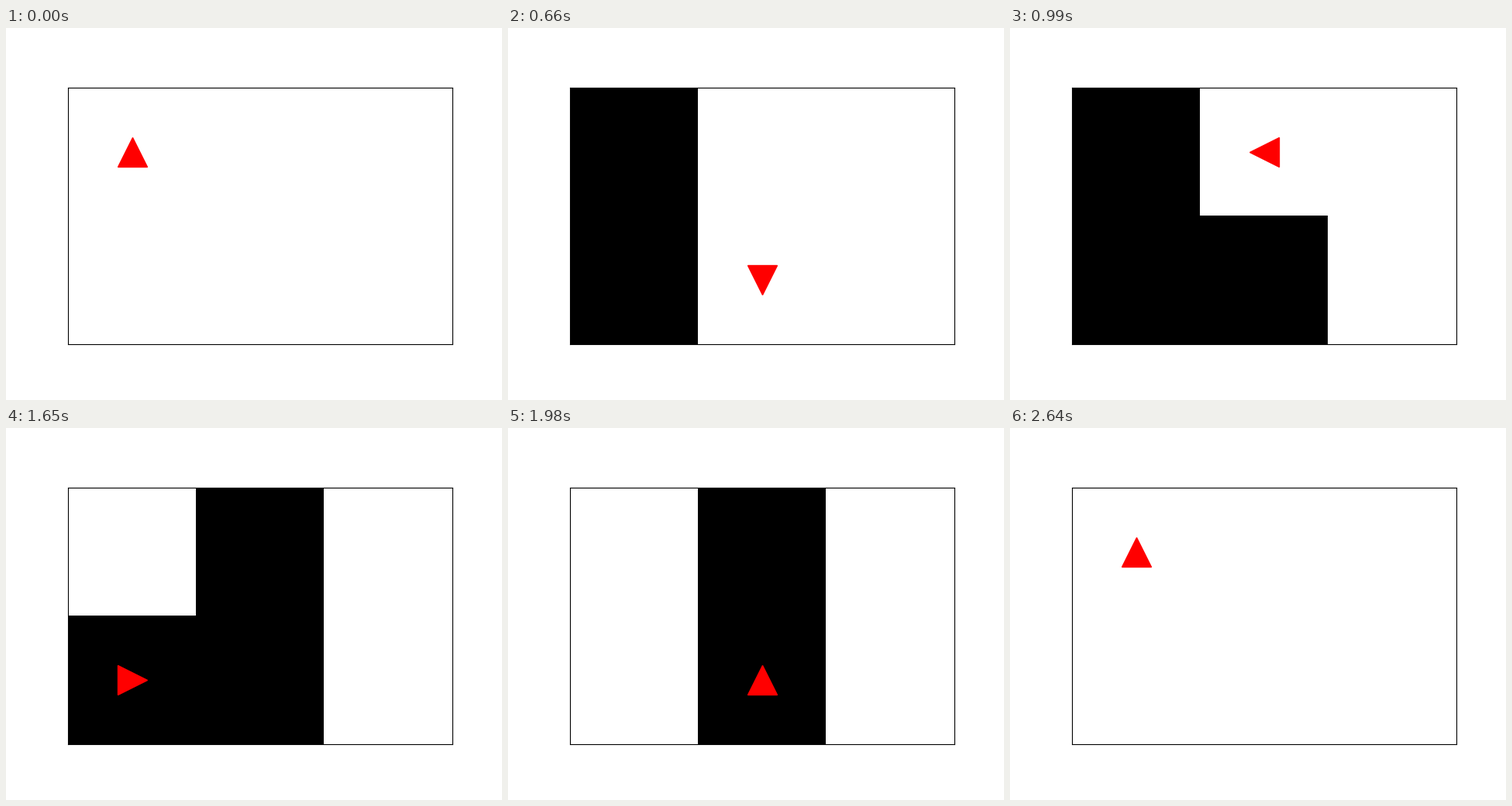
A matplotlib script that plays this animation: 640 px wide and 480 px high, repeating every 2970 ms.

```python
import matplotlib.pyplot as plt
import numpy as np
from matplotlib.animation import FuncAnimation

ROWS, COLS = 2, 3
STEPS = 9
STEP_MS = 330

# Headings in clockwise order: marker and (row, column) move
HEADINGS = [("^", (-1, 0)), (">", (0, 1)), ("v", (1, 0)), ("<", (0, -1))]


def walk(steps):
    """Run the ant on a wrapping grid; return grid, cell and heading."""
    grid = np.zeros((ROWS, COLS), dtype=int)
    row = col = heading = 0
    for _ in range(steps):
        grid[row, col] ^= 1
        d_row, d_col = HEADINGS[heading][1]
        row, col = (row + d_row) % ROWS, (col + d_col) % COLS
        # Right turn on white, left turn on black
        heading = (heading + (-1 if grid[row, col] else 1)) % 4
    return grid, row, col, heading


fig, ax = plt.subplots(figsize=(6.4, 4.8), dpi=100)
board = ax.imshow(np.zeros((ROWS, COLS)), cmap="binary", vmin=0, vmax=1,
                  interpolation="nearest")
ant, = ax.plot([0], [0], "^", color="red", markersize=28)
ax.set(xticks=[], yticks=[], xlim=(-0.5, COLS - 0.5), ylim=(ROWS - 0.5, -0.5))


def update(step):
    grid, row, col, heading = walk(step)
    board.set_data(grid)
    ant.set_data([col], [row])
    ant.set_marker(HEADINGS[heading][0])
    return board, ant


anim = FuncAnimation(fig, update, frames=STEPS, interval=STEP_MS,
                     repeat=True, repeat_delay=0)
plt.show()
```
